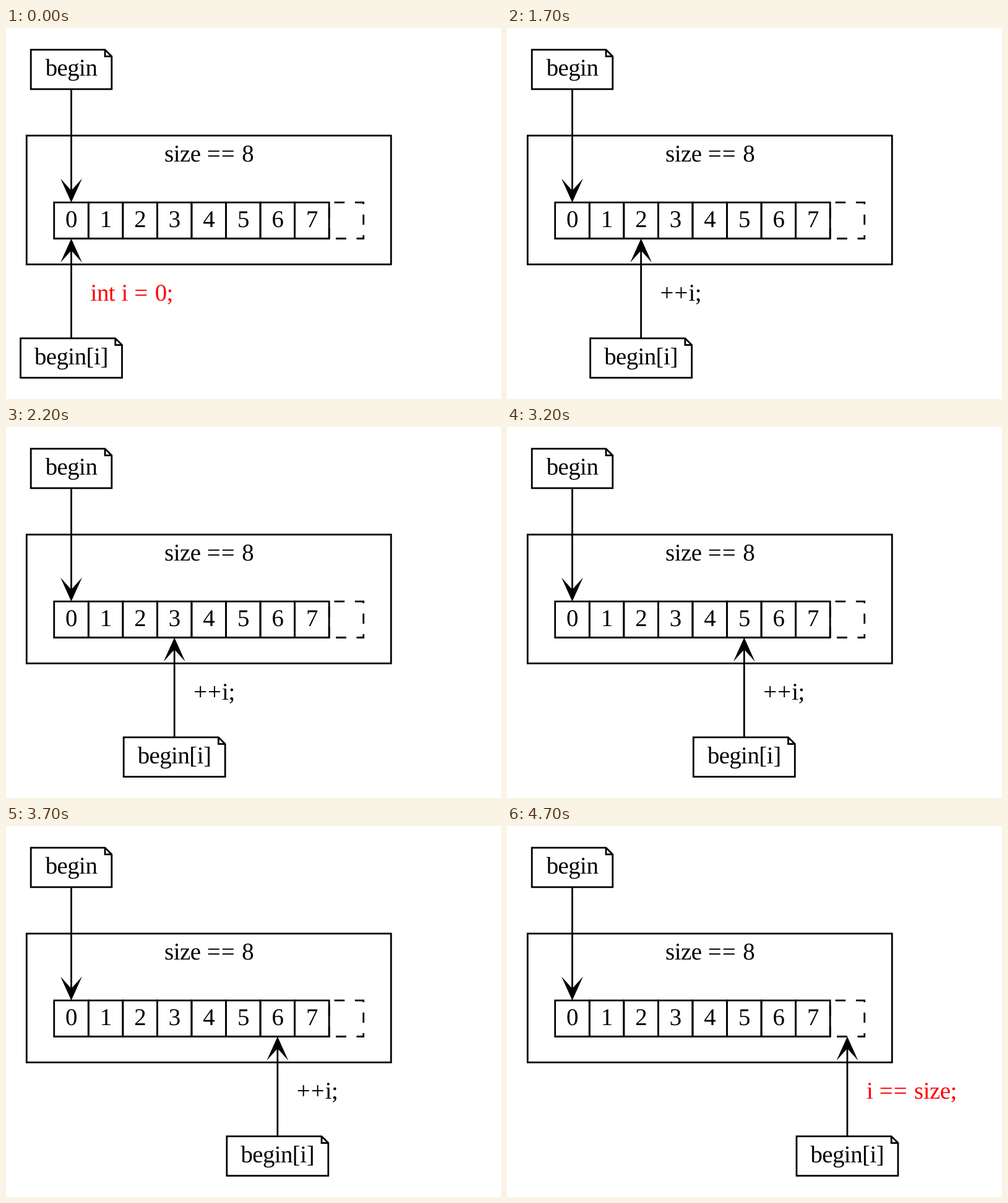
These frames come from a looping animation (800x600 px, 5.9 s). An HTML page:

```html
<!DOCTYPE html>
<html>
<head>
<meta charset="utf-8">
<style>
  html, body { margin: 0; width: 100%; height: 100%; overflow: hidden; background: #fff; }
  svg { display: block; fill: none; stroke: #000; stroke-width: 2.78; stroke-miterlimit: 10; }
  text { font: 38.89px "Liberation Serif", "Times New Roman", serif; fill: #000; stroke: none; text-rendering: geometricPrecision; }
</style>
</head>
<body>
<svg id="stage" width="800" height="600" viewBox="0 0 800 600"></svg>
<script>
const STEP = 55.56, FIRST = 105.5, LOOP = 5900;
const TOP = 282.2, BOTTOM = 340.5;

const pen = document.createElement('canvas').getContext('2d');
pen.font = '1000px "Liberation Serif", "Times New Roman", serif';

// Letters advance by whole pixels of a smaller layout size, then scale up.
const LAYOUT = 18.667, ZOOM = 38.89 / LAYOUT;
const advance = c => Math.round(pen.measureText(c).width * LAYOUT / 1000) * ZOOM;

function text(str, x, y, centered = true, color = '#000') {
  const widths = [...str].map(advance);
  if (centered) x -= widths.reduce((a, b) => a + b, 0) / 2;
  const xs = widths.map(w => (x += w) - w);
  return `<text x="${xs.map(v => v.toFixed(2)).join(' ')}" y="${y}" fill="${color}" style="fill:${color}" xml:space="preserve">${str}</text>`;
}

function note(str, half, y) {
  const l = FIRST - half, r = FIRST + half, b = y + 63.8, f = 10.8;
  return `<path d="M${r - f} ${y}H${l}V${b}H${r}V${y + f}ZV${y + f}H${r}"/>` + text(str, FIRST, y + 42.3);
}

// dir is 1 for an arrow pointing down, -1 for up.
function arrow(from, to, dir) {
  const tip = to - 3.4 * dir, notch = tip - 13.9 * dir, back = tip - 27.8 * dir;
  return `<path d="M${FIRST} ${from}V${notch}"/>
    <path fill="#000" d="M${FIRST} ${tip}L${FIRST + 12.5} ${back}L${FIRST} ${notch}L${FIRST - 12.5} ${back}Z"/>`;
}

function cell(i) {
  const l = FIRST + (i - 0.5) * STEP;
  const dash = i === 8 ? 'stroke-dasharray="16.67"' : '';
  return `<path ${dash} d="M${l} ${BOTTOM}V${TOP}H${l + STEP}V${BOTTOM}Z"/>` +
    (i < 8 ? text(String(i), FIRST + i * STEP, 322) : '');
}

const label = i => i === 0 ? ['int i = 0;', 'red'] : i === 8 ? ['i == size;', 'red'] : ['++i;', '#000'];

document.getElementById('stage').innerHTML =
  note('begin', 65.3, 35.1) + arrow(99, TOP, 1) +
  `<rect x="33.3" y="174" width="589" height="208.3"/>` +
  text('size == 8', 328, 216) +
  Array.from({ length: 9 }, (_, i) => cell(i)).join('') +
  `<g id="cursor">${note('begin[i]', 82, 501.8)}${arrow(501.8, BOTTOM, -1)}<g id="label"></g></g>`;

const cursor = document.getElementById('cursor');
const caption = document.getElementById('label');
let shown = -1;

function draw() {
  const t = performance.now() % LOOP;
  const i = t < 1200 ? 0 : Math.min(8, Math.floor((t - 1200) / 500) + 1);
  if (i !== shown) {
    const [str, color] = label(i);
    cursor.setAttribute('transform', `translate(${i * STEP} 0)`);
    caption.innerHTML = text(str, FIRST + 31, 441, false, color);
    shown = i;
  }
  requestAnimationFrame(draw);
}
draw();
</script>
</body>
</html>
```
